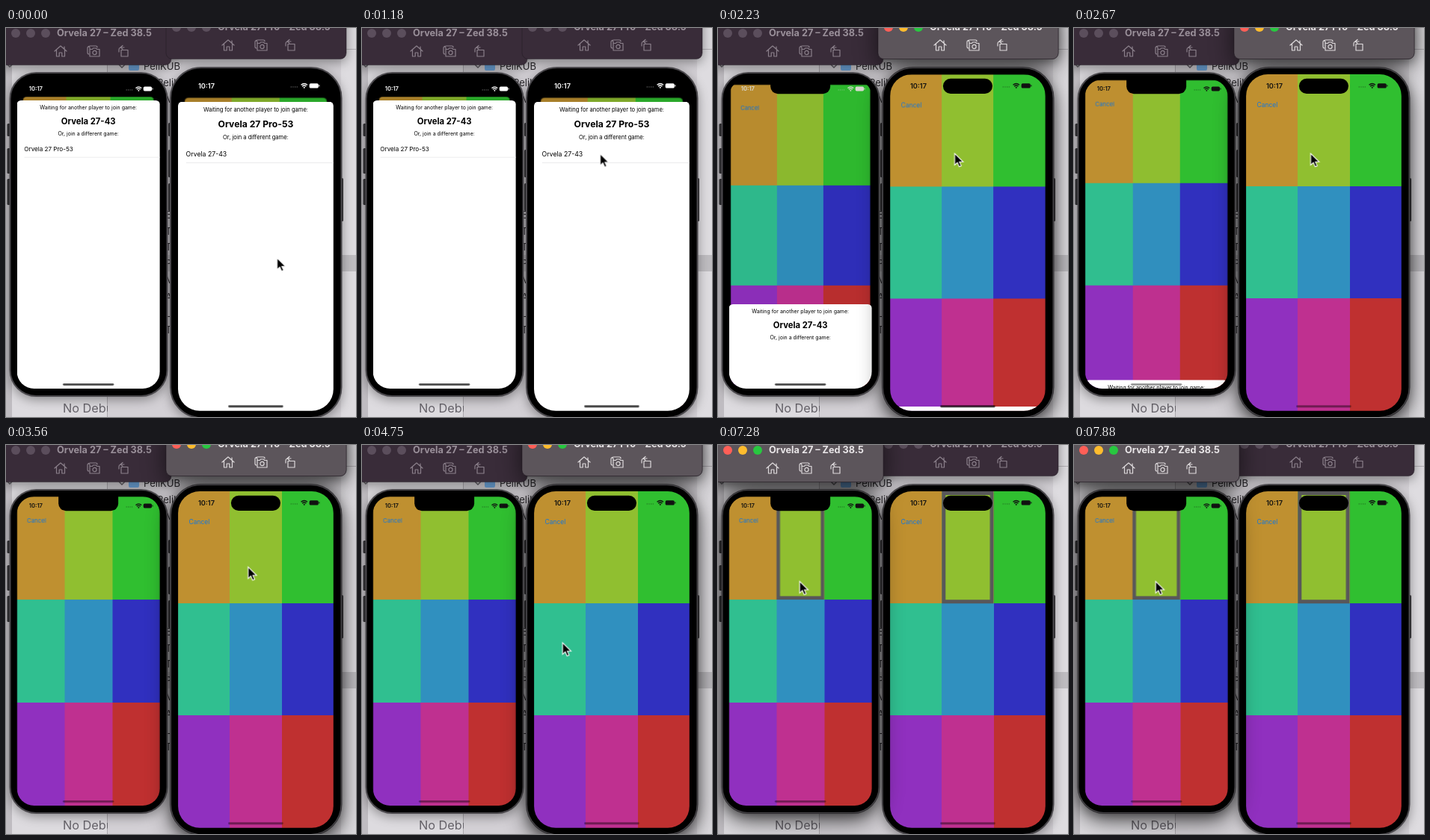
Recreate the animation shown at these times as an HTML page. Size 468 by 521 pixels, loop 8000 ms.

```html
<!DOCTYPE html>
<html lang="en">
<head>
<meta charset="utf-8">
<title>Two players</title>
<style>
html, body { margin: 0; width: 100%; height: 100%; overflow: hidden; background: #cfccd1; }
svg { display: block; width: 468px; height: 521px; font-family: Inter, Roboto, sans-serif; }
</style>
</head>
<body>
<svg id="stage" viewBox="0 0 468 521"></svg>
<script>
const LOOP = 8000;
const stage = document.getElementById('stage');

const rect = (x, y, w, h, fill, more = '') =>
  `<rect x="${x}" y="${y}" width="${w}" height="${h}" fill="${fill}" ${more}/>`;
const text = (x, y, size, str, more = '') =>
  `<text x="${x}" y="${y + size * 0.36}" font-size="${size}" ${more}>${str}</text>`;

const MID = 'text-anchor="middle"';
const phones = [
  { id: 'a', x: 14.5, y: 69, k: 0.4905, W: 390, H: 844, inset: 47, round: 47,
    body: [5.5, 60, 210, 433, 35], clock: [33, 25.5, 15.6], edge: 370,
    name: 'Orvela 27-43', other: 'Orvela 27 Pro-53',
    keys: [[1.5, 128, 17], [1.5, 161, 34], [1.5, 202, 35]] },
  { id: 'b', x: 230, y: 62, k: 0.529, W: 393, H: 852, inset: 59, round: 55,
    body: [220, 53, 228.5, 469, 41], clock: [51, 29, 17.3], edge: 357,
    name: 'Orvela 27 Pro-53', other: 'Orvela 27-43',
    keys: [[217, 127, 18], [217, 163, 37], [217, 208, 37], [446.5, 201, 58]] }
];
const bars = [
  { id: 'a', x: -10, w: 231, bottom: 49.5, dot: 13, y: 7, title: 'Orvela 27 – Zed 38.5', icons: [73, 117, 157] },
  { id: 'b', x: 214, w: 241, bottom: 41.5, dot: 228, y: -1, title: 'Orvela 27 Pro – Zed 38.5', icons: [297, 341, 380] }
];

function tiles({ W, H }) {
  let out = '';
  for (let i = 0; i < 9; i++) {
    out += rect(i % 3 * W / 3, Math.floor(i / 3) * H / 3, W / 3 + 0.5, H / 3 + 0.5,
      `hsl(${40 * (i + 1)} 60% 46.9%)`);
  }
  return `<g shape-rendering="crispEdges">${out}</g>`;
}

function mark({ W, H }, cls, col, row) {
  return rect(col * W / 3 + 4.7, row * H / 3 + 4.7, W / 3 - 9.4, H / 3 - 9.4, 'none',
    `class="${cls}" stroke="#58575a" stroke-width="9.4" opacity="0"`);
}

function status({ id, clock: [x, y, size], edge }) {
  let dots = '';
  for (let i = 0; i < 4; i++) dots += `<circle cx="${edge - 71 + i * 5}" cy="${y + 3}" r="1.3" opacity=".45"/>`;
  return `<g id="status-${id}" fill="currentColor" color="#fff">
    ${text(x, y, size, '10:17', 'font-weight="600"')}${dots}
    <g fill="none" stroke="currentColor" stroke-width="2.6">
      <path d="M${edge - 46} ${y - 2}q8-7 16 0M${edge - 43} ${y + 1.5}q5-4.5 10 0"/></g>
    <circle cx="${edge - 38}" cy="${y + 4.5}" r="2"/>
    ${rect(edge - 25, y - 6, 23, 12, 'currentColor', 'rx="3.5"')}
    ${rect(edge - 1, y - 2, 2, 4, 'currentColor')}</g>`;
}

function alertBox({ W }) {
  return `<g id="alert" opacity="0">
    ${text(W / 2, 378, 15.8, 'Connecting to “Orve…', MID + ' filter="url(#lift)"')}
    ${rect(75.6, 397, 242, 128, '#fff', 'rx="9" filter="url(#lift)"')}
    ${text(W / 2, 487, 16, 'Cancel', MID + ' fill="#0a7aff"')}</g>`;
}

function sheet(p) {
  const { id, W, H, inset } = p, top = inset + 10;
  return `<g id="sheet-${id}">
    ${rect(0, top, W, H, '#fff', 'rx="11"')}
    ${text(W / 2, top + 20, 14.3, 'Waiting for another player to join game:', MID)}
    ${text(W / 2, top + 56.5, 23, p.name, MID + ' font-weight="700"')}
    ${text(W / 2, top + 90.5, 14.3, 'Or, join a different game:', MID)}
    <g id="list-${id}">${text(20, top + 132.5, 16.5, p.other)}
    ${rect(20, top + 154.5, W - 20, 1.6, '#e6e6e8')}</g>
    ${id === 'b' ? alertBox(p) : ''}</g>`;
}

function phone(p) {
  const { id, W, H, inset, round } = p, [bx, by, bw, bh, br] = p.body;
  const hole = id === 'a'
    ? rect(W / 2 - 81.5, -30, 163, 69, '#000', 'rx="20"')
    : rect(W / 2 - 62.5, 11, 125, 38, '#000', 'rx="19"');
  return `${p.keys.map(([x, y, h]) => rect(x, y, 4.5, h, '#2b2a2d', 'rx="1.5"')).join('')}
    ${rect(bx, by, bw, bh, '#000', `rx="${br}" stroke="#4a484c" stroke-width="2"`)}
    <clipPath id="clip-${id}">${rect(0, 0, W, H, '#000', `rx="${round}"`)}</clipPath>
    <clipPath id="card-clip-${id}">${rect(0, 0, W, H + 20, '#000', 'rx="11"')}</clipPath>
    <g transform="translate(${p.x} ${p.y}) scale(${p.k})"><g clip-path="url(#clip-${id})">
      ${rect(0, 0, W, H, '#000')}
      <g id="card-${id}"><g clip-path="url(#card-clip-${id})">
        ${tiles(p)}${mark(p, 'top', 1, 0)}${mark(p, 'left', 0, 1)}
        ${text(27.5, inset + 18, 16, 'Cancel', `id="cancel-${id}"`)}
        ${rect(0, 0, W, H, '#000', `id="dim-${id}"`)}</g></g>
      ${sheet(p)}${hole}${status(p)}
      ${rect(W / 2 - 69.5, H - 14, 139, 5.5, '#000', 'rx="2.7" class="grip"')}
    </g></g>`;
}

function bar({ id, x, w, bottom, dot, y, title, icons }, active) {
  const lights = active ? ['#ff5f57', '#febc2e', '#28c840'] : Array(3).fill('#5b4e5c');
  const ink = active ? '#dedadc' : '#8b808b';
  const [home, shot, turn] = icons, iy = y + 24;
  return `<g ${active ? `class="front-${id}" opacity="0"` : ''}>
    ${rect(x, -30, w, bottom + 30, active ? '#5c555b' : '#392c39', 'rx="8" stroke="#211a22" stroke-opacity=".5"')}
    ${lights.map((c, i) => `<circle cx="${dot + 20 * i}" cy="${y}" r="6" fill="${c}"/>`).join('')}
    ${text(dot + 55, y - 0.5, 12.7, title, `font-weight="700" fill="${active ? '#e9e6e8' : '#9a909a'}"`)}
    <g fill="none" stroke="${ink}" stroke-width="1.2" stroke-linejoin="round" stroke-linecap="round">
      <path transform="translate(${home} ${iy})" d="M-8 0L0-7L8 0M-5.5-2V7H-1.8V2H1.8V7H5.5V-2M5-6V-3"/>
      <g transform="translate(${shot} ${iy})"><path d="M-5-3V-4.5Q-5-6-7-6Q-8-6-8-4V2Q-8 4-6 4M-8-5Q-7-7-4-7H3Q5-7 5-5"/>
        <path d="M-5-2.5H-1.5L-.5-4H3.5L4.5-2.5H8V7H-5Z"/><circle cx="1.5" cy="2" r="2.6"/></g>
      <path transform="translate(${turn} ${iy})" d="M-3-1.5H6V7H-3ZM-6 1V-2Q-6-5-2-5H1M-1-7.5L-4-5L-1-2.8"/>
    </g></g>`;
}

// The outline of a window: its bar and its phone, used to cast shadows.
function outline(i, more) {
  const [x, y, w, h, r] = phones[i].body, b = bars[i];
  return `<g ${more}>${rect(b.x, -30, b.w, b.bottom + 30, '#000', 'rx="8"')}
    ${rect(x, y, w, h, '#000', `rx="${r}"`)}</g>`;
}

function desk() {
  const rows = [[95, 'M'], [250, 'E'], [272, 'T'], [293, 'T'], [315, 'P'], [337, 'M'], [360, 'A'], [382, 'L'], [404, 'T']];
  return `${rect(0, 0, 468, 521, '#d3d0d5')}
    ${rect(0, 0, 8, 521, '#bfbcc1')}
    ${rect(8, 40, 128, 481, '#dddbdf')}
    ${rect(135, 40, 1, 481, '#aaa7ac')}
    ${rect(448, 0, 20, 521, '#dedce0')}
    ${rect(448, 28, 20, 1, '#b4b1b6')}
    ${rect(205, 304, 263, 22, '#bebcc0')}
    <path d="M1 48l4 4l4-4M151 49l4 4l4-4" fill="none" stroke="#5f5c62" stroke-width="1.5"/>
    ${rect(164, 46, 14, 11, '#6ea6dd', 'rx="2"')}
    <g fill="#29272b">${text(184, 51.5, 13, 'PeliKUB')}${text(202, 73, 13, 'PeliKUB')}
    ${rows.map(([y, s]) => text(213, y, 13, s)).join('')}</g>
    <clipPath id="pane">${rect(8, 490, 128, 31, '#000')}</clipPath>
    <g clip-path="url(#pane)">${text(76, 509, 16.3, 'No Debug', 'fill="#66636a"')}</g>`;
}

// Blurs a shape into a shadow and keeps only the part outside the shape.
const cast = (id, blur, dy, alpha) => `<filter id="${id}" filterUnits="userSpaceOnUse" x="-80" y="-80" width="640" height="700">
  <feGaussianBlur in="SourceAlpha" stdDeviation="${blur}"/><feOffset dy="${dy}"/>
  <feComponentTransfer><feFuncA type="linear" slope="${alpha}"/></feComponentTransfer>
  <feComposite in2="SourceAlpha" operator="out"/></filter>`;

stage.innerHTML = `<defs>
  ${cast('near', 8, 4, 0.42)}${cast('far', 16, 10, 0.6)}
  <filter id="lift" x="-10%" y="-40%" width="120%" height="200%">
    <feDropShadow dx="4" dy="4" stdDeviation="2.5" flood-color="#000" flood-opacity=".5"/></filter></defs>
  ${desk()}
  ${outline(0, 'filter="url(#near)"')}${outline(1, 'filter="url(#near)"')}
  ${phones.map(phone).join('')}
  ${bars.map(b => bar(b, false)).join('')}
  ${bars.map((b, i) => outline(i, `class="front-${b.id}" opacity="0" filter="url(#far)"`) + bar(b, true)).join('')}
  <path id="cursor" d="M0 0V15.6L3.6 12.3L6 17.8L8.7 16.6L6.3 11.3H11.3Z" fill="#000" stroke="#fff" stroke-width="1.1"/>`;

// Plays a table of [time, value] steps, each held until the next one.
function hold(target, prop, table) {
  const frames = table.map(([t, v]) => ({ offset: t / LOOP, [prop]: v, easing: 'step-end' }));
  frames.push({ offset: 1, [prop]: table.at(-1)[1] });
  stage.querySelectorAll(target).forEach(el => el.animate(frames, { duration: LOOP, iterations: Infinity }));
}

// Starts hidden or shown, then flips at each time.
const flip = (target, start, ...times) =>
  hold(target, 'opacity', [[0, start], ...times.map((t, i) => [t, i % 2 ? start : 1 - start])]);

const ease = u => u * u * (3 - 2 * u);
function glide(t0, t1, n, [x0, y0], [x1, y1]) {
  return Array.from({ length: n }, (_, i) => {
    const e = ease((i + 1) / n);
    return [t0 + (t1 - t0) * i / (n - 1), [x0 + (x1 - x0) * e, y0 + (y1 - y0) * e]];
  });
}

const drop = {
  a: [[0, 0], [2080, 0.3], [2230, 0.707], [2380, 0.9], [2530, 0.97], [2680, 0.993], [2820, 1]],
  b: [[0, 0], [1930, 0.14], [2080, 0.66], [2230, 0.986], [2380, 1]]
};
for (const { id, W, H, inset } of phones) {
  const steps = f => drop[id].map(([t, p]) => [t, f(p)]);
  hold('#sheet-' + id, 'transform', steps(p => `translate(0px, ${p * (H - inset - 10)}px)`));
  hold('#card-' + id, 'transform', steps(p => {
    const s = 0.916 + 0.084 * p;
    return `translate(${(1 - s) * W / 2}px, ${inset * (1 - p)}px) scale(${s})`;
  }));
  hold('#dim-' + id, 'opacity', steps(p => 0.12 * (1 - p)));
  hold('#cancel-' + id, 'fill', [[0, 'rgba(0,0,0,.28)'], [2230, '#1577dc']]);
}
hold('#status-a', 'color', [[0, '#fff'], [2230, '#d8d8d0'], [2380, '#111']]);
hold('#status-b', 'color', [[0, '#fff'], [2230, '#111']]);
hold('.grip', 'opacity', [[0, 0.72], [2530, 0.42]]);
flip('#list-a', 1, 2080);
flip('#list-b', 1, 1930);
flip('#alert', 0, 1930, 2080);
flip('.top', 0, 3120, 3560, 4010, 4310, 7280, 7580, 7880);
flip('.left', 0, 5050, 5340, 5490, 5790, 6090, 6240);
flip('.front-b', 0, 1930, 7280);
flip('.front-a', 0, 7280);

const path = [
  [0, [362.5, 308]],
  ...glide(450, 1180, 6, [362.5, 308], [318.5, 168.5]),
  [1480, [316.5, 168]],
  [3120, [323.7, 163.3]],
  [4010, [318.7, 162]],
  ...glide(4610, 4750, 2, [318.7, 162], [268.2, 264.7]),
  [5490, [265, 264]],
  [5790, [262.2, 263.3]],
  ...glide(6390, 6980, 5, [262.2, 263.3], [109.2, 182.6])
];
hold('#cursor', 'transform', path.map(([t, [x, y]]) => [t, `translate(${x}px, ${y}px)`]));
</script>
</body>
</html>
```
